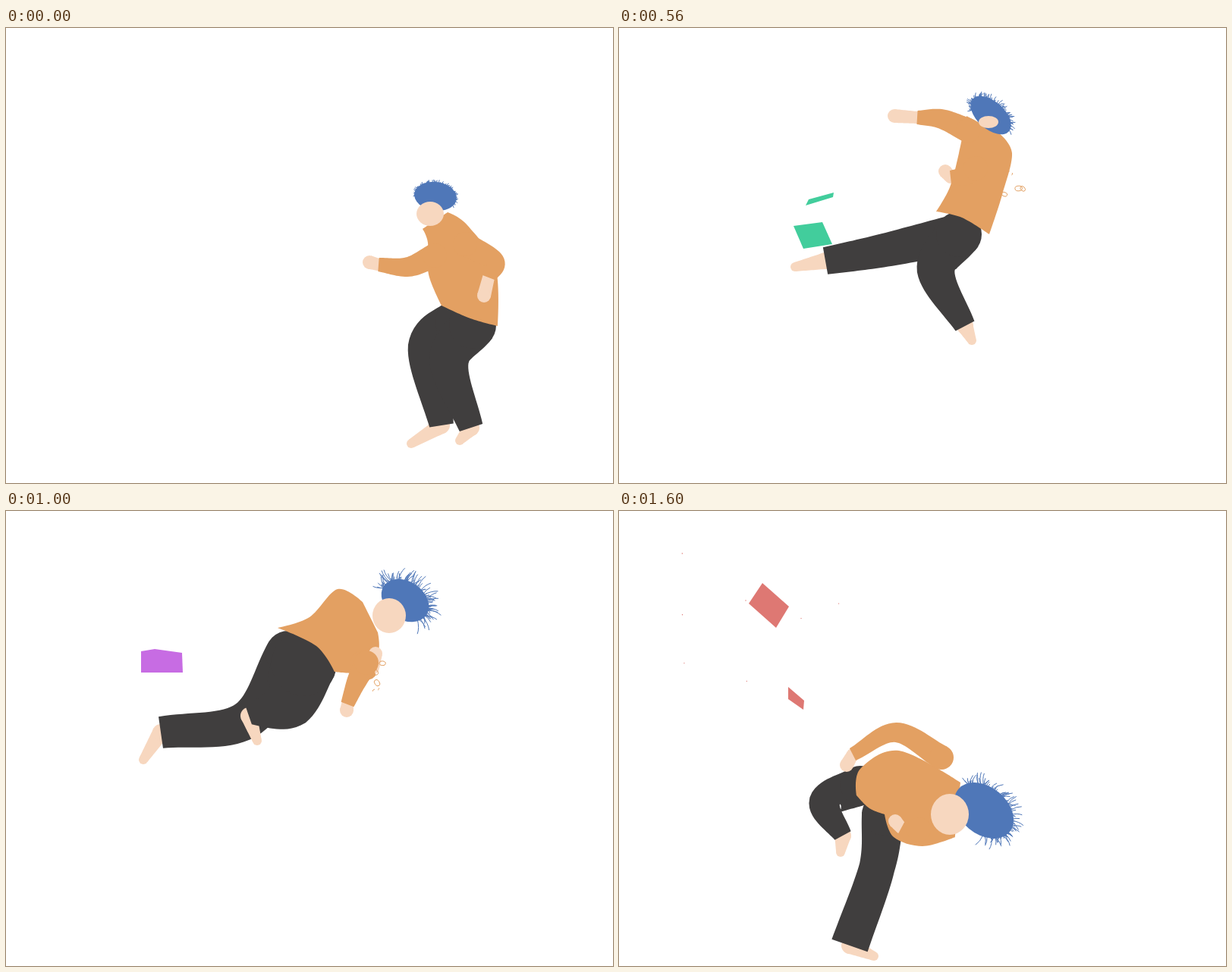
These frames come from a looping animation (800x600 px, 1640 ms). An HTML page with a canvas:

```html
<!DOCTYPE html>
<html lang="en">
<head>
<meta charset="utf-8">
<title>Triple kick</title>
<style>
html, body { margin: 0; width: 100%; height: 100%; overflow: hidden; background: #fff; }
canvas { display: block; }
</style>
</head>
<body>
<canvas id="stage" width="800" height="600"></canvas>
<script>
const ctx = document.getElementById('stage').getContext('2d');
const LOOP = 1640, STEP = 40;
const ORANGE = '#e3a062', SKIN = '#f7d7bf', DARK = '#403e3e', BLUE = '#4f77b8';
const GREEN = '#42cd9c', PURPLE = '#c76ce3', RED = '#de7873';

// Key poses of the rig.
// legs: hip, knee, ankle, toe, then thigh and ankle radius; arms: shoulder, elbow, wrist, fingertip
// torso: neck front and back, two down the back, waist (3), belly, chest
// face: centre, radii; hair: centre, radii, tilt in degrees; shag: strand length
const poses = [
  { t: 0, shag: 4,
    legs: [[600, 388, 558, 423, 574, 524, 534, 548, 34, 16], [615, 392, 584, 440, 613, 527, 598, 544, 31, 16]],
    arms: [[565, 300, 530, 315, 491, 312, 479, 309], [605, 285, 644, 308, 636, 329, 630, 353]],
    torso: [549, 265, 582, 243, 608, 260, 645, 315, 648, 393, 612, 383, 574, 366, 557, 325, 556, 283],
    face: [559, 245, 18, 16], hair: [566, 222, 28, 19, 8] },
  { t: 360, shag: 5,
    legs: [[455, 325, 383, 303, 327, 302, 304, 288, 26, 20], [472, 357, 464, 430, 450, 549, 467, 571, 27, 18]],
    arms: [[445, 218, 405, 187, 399, 163, 418, 163], [540, 235, 563, 208, 541, 151, 523, 131]],
    torso: [481, 212, 518, 209, 554, 232, 527, 290, 522, 362, 475, 341, 429, 296, 437, 245, 440, 205],
    face: [497, 196, 17, 16], hair: [506, 182, 29, 20, 20] },
  { t: 560, shag: 7,
    legs: [[440, 273, 345, 294, 272, 307, 232, 315, 26, 18], [448, 272, 418, 320, 456, 393, 465, 412, 30, 14]],
    arms: [[460, 135, 425, 120, 393, 118, 363, 116], [470, 185, 455, 195, 437, 197, 430, 189]],
    torso: [458, 116, 500, 138, 518, 165, 505, 220, 488, 272, 452, 250, 418, 242, 436, 210, 448, 165],
    face: [487, 124, 13, 8], hair: [490, 115, 32, 18, 42] },
  { t: 840, shag: 6,
    legs: [[392, 205, 308, 226, 206, 187, 160, 184, 28, 20], [414, 212, 418, 290, 340, 357, 327, 397, 32, 21]],
    arms: [[410, 130, 395, 140, 385, 155, 385, 155], [505, 135, 513, 173, 486, 204, 486, 204]],
    torso: [440, 108, 495, 114, 500, 140, 482, 185, 448, 221, 420, 183, 371, 165, 383, 139, 410, 118],
    face: [460, 102, 5, 4], hair: [473, 96, 28, 18, 20] },
  { t: 1000, shag: 16,
    legs: [[372, 188, 316, 276, 204, 292, 181, 328, 30, 21], [393, 201, 370, 253, 320, 270, 331, 303, 43, 12]],
    arms: [[470, 200, 476, 210, 484, 207, 487, 188], [475, 200, 462, 225, 450, 255, 449, 263]],
    torso: [470, 120, 490, 160, 491, 185, 475, 212, 433, 212, 409, 178, 358, 154, 400, 140, 437, 103],
    face: [505, 138, 22, 23], hair: [526, 118, 34, 25, 35] },
  { t: 1240, shag: 8,
    legs: [[348, 262, 344, 345, 331, 455, 336, 498, 28, 15], [335, 232, 280, 162, 227, 91, 168, 44, 25, 15]],
    arms: [[410, 172, 362, 166, 358, 205, 357, 226], [465, 255, 458, 275, 426, 299, 415, 299]],
    torso: [455, 185, 480, 230, 486, 260, 450, 291, 379, 294, 360, 280, 352, 260, 372, 216, 425, 165],
    face: [480, 207, 20, 24], hair: [494, 186, 29, 35, 0] },
  { t: 1600, shag: 14,
    legs: [[348, 400, 340, 470, 304, 573, 336, 587, 28, 25], [318, 362, 272, 385, 295, 428, 292, 450, 26, 12]],
    arms: [[425, 325, 365, 292, 308, 321, 300, 335], [395, 420, 385, 425, 372, 418, 364, 409]],
    torso: [450, 358, 443, 430, 400, 442, 362, 430, 350, 400, 330, 392, 313, 375, 318, 340, 369, 316],
    face: [436, 400, 25, 27], hair: [481, 395, 44, 31, 40] }
];

const mix = (a, b, k) => a + (b - a) * k;
const mixAll = (a, b, k) => a.map((v, i) => mix(v, b[i], k));
const noise = n => { const s = Math.sin(n * 127.1 + 3.7) * 43758.5453; return s - Math.floor(s); };
const pairs = list => list.flatMap((v, i) => i % 2 ? [] : [[v, list[i + 1]]]);

// Bones swing the short way round and change length evenly.
function swing(a, b, k) {
  const out = mixAll(a, b, k);
  for (let j = 2; j < 8; j += 2) {
    const ax = a[j] - a[j - 2], ay = a[j + 1] - a[j - 1], bx = b[j] - b[j - 2], by = b[j + 1] - b[j - 1];
    const turn = Math.atan2(ax * by - ay * bx, ax * bx + ay * by);
    const angle = Math.atan2(ay, ax) + turn * k, len = mix(Math.hypot(ax, ay), Math.hypot(bx, by), k);
    out[j] = out[j - 2] + len * Math.cos(angle);
    out[j + 1] = out[j - 1] + len * Math.sin(angle);
  }
  return out;
}

function fill(pts, color) {
  ctx.beginPath();
  pts.forEach(p => ctx.lineTo(p[0], p[1]));
  ctx.fillStyle = color;
  ctx.fill();
}

function oval(x, y, rx, ry, color, tilt = 0) {
  ctx.beginPath();
  ctx.ellipse(x, y, Math.max(rx, 0), Math.max(ry, 0), tilt, 0, 2 * Math.PI);
  ctx.fillStyle = color;
  ctx.fill();
}

// Tapered tube along a smooth line, round at its root.
function tube(joints, radii, color) {
  const last = joints.length - 1, left = [], right = [];
  const slope = i => {
    const a = joints[Math.max(i - 1, 0)], b = joints[Math.min(i + 1, last)];
    const half = i > 0 && i < last ? 2 : 1;
    return [(b[0] - a[0]) / half, (b[1] - a[1]) / half];
  };
  for (let i = 0; i < last; i++) {
    const p = joints[i], q = joints[i + 1], m = slope(i), n = slope(i + 1);
    for (let s = 0; s <= 16; s++) {
      const u = s / 16, v = 1 - u, r = mix(radii[i], radii[i + 1], u);
      const at = c => p[c] * (1 + 2 * u) * v * v + m[c] * u * v * v + q[c] * u * u * (3 - 2 * u) - n[c] * u * u * v;
      const way = c => 6 * u * v * (q[c] - p[c]) + m[c] * v * (1 - 3 * u) + n[c] * u * (3 * u - 2);
      const x = at(0), y = at(1), dx = way(0), dy = way(1), d = Math.hypot(dx, dy) || 1;
      left.push([x - dy / d * r, y + dx / d * r]);
      right.unshift([x + dy / d * r, y - dx / d * r]);
    }
  }
  fill([...left, ...right], color);
  oval(...joints[0], radii[0], radii[0], color);
}

function tip(from, to, r1, r2) {
  tube([from, to], [r1, r2], SKIN);
  oval(...to, r2, r2, SKIN);
}

function drawLeg(leg) {
  const [hip, knee, ankle, toe] = pairs(leg.slice(0, 8)), [thigh, cuff] = leg.slice(8);
  tip(ankle, toe, 11, 6);
  tube([hip, knee, ankle], [thigh, thigh * .84, cuff], DARK);
}

function drawArm(arm) {
  const [shoulder, elbow, wrist, hand] = pairs(arm);
  tip(wrist, hand, 8, 9);
  tube([shoulder, elbow, wrist], [16, 13, 9], ORANGE);
}

// Smooth outline with corners at the neck and the waist ends.
function drawTorso(list) {
  const p = pairs(list), n = p.length, corner = [0, 1, 4, 6];
  const slope = (i, c) => corner.includes(i) ? 0 : (p[(i + 1) % n][c] - p[(i + n - 1) % n][c]) / 6;
  ctx.beginPath();
  ctx.moveTo(...p[0]);
  p.forEach((a, i) => {
    const j = (i + 1) % n, b = p[j];
    ctx.bezierCurveTo(a[0] + slope(i, 0), a[1] + slope(i, 1), b[0] - slope(j, 0), b[1] - slope(j, 1), ...b);
  });
  ctx.fillStyle = ORANGE;
  ctx.fill();
}

// Strands stand on the side of the hair turned away from the face.
function drawHead(face, [x, y, rx, ry, degrees], shag) {
  const tilt = degrees * Math.PI / 180, c = Math.cos(tilt), s = Math.sin(tilt);
  const away = Math.atan2(y - face[1], x - face[0]);
  oval(x, y, rx, ry, BLUE, tilt);
  ctx.lineWidth = 1;
  for (let i = 0; i < 90; i++) {
    const angle = away + (noise(i) - .5) * 3.8, a = angle - tilt;
    const ex = rx * Math.cos(a) * .92, ey = ry * Math.sin(a) * .92;
    const px = x + ex * c - ey * s, py = y + ex * s + ey * c;
    const way = angle + (noise(i + 100) - .4) * 1.2, len = shag * (.3 + noise(i + 200));
    const dx = Math.cos(way) * len, dy = Math.sin(way) * len;
    ctx.beginPath();
    ctx.moveTo(px, py);
    ctx.quadraticCurveTo(px + dx * .6 + dy * .15, py + dy * .6 - dx * .15, px + dx, py + dy);
    ctx.strokeStyle = BLUE;
    ctx.stroke();
  }
  oval(...face, SKIN);
}

// A few loose threads by the back of the shirt.
function drawThreads(x, y, t) {
  ctx.strokeStyle = ORANGE;
  ctx.lineWidth = 1;
  for (let i = 0; i < 5; i++) {
    const n = t + i * 9, r = 1 + 4 * noise(n);
    ctx.beginPath();
    ctx.ellipse(x + 30 * noise(n + 1), y + 60 * noise(n + 2) - 30, r, r * .7, n, 0, r > 3 ? 6.3 : 2);
    ctx.stroke();
  }
}

const piece = (color, dx, dy, ...list) => fill(pairs(list).map(([x, y]) => [x + dx, y + dy]), color);

function drawBoards(t) {
  if (t >= 480 && t < 560) piece(GREEN, 0, 0, 232, 222, 284, 216, 281, 286, 240, 291);
  if (t >= 560 && t < 720) {
    const d = t - 560;
    piece(GREEN, -d * .05, -d * .1, 246, 234, 250, 226, 283, 217, 282, 223);
    piece(GREEN, -d * .02, d * .25, 230, 261, 268, 256, 281, 285, 243, 291);
  }
  if (t >= 760 && t < 1120) piece(PURPLE, 0, 0, 178, 185, 196, 182, 232, 187, 233, 213, 178, 213);
  if (t >= 1200 && t < 1320) piece(RED, 0, 0, 173, 58, 163, 95, 165, 112, 215, 123, 226, 88, 228, 51, 190, 39);
  if (t >= 1320) {
    const k = (t - 1280) / 320, rest = 1 - k * k;
    piece(RED, 0, -40 * rest, 189, 95, 224, 126, 207, 154, 171, 122);
    piece(RED, -20 * rest, -150 * rest, 223, 232, 244, 250, 243, 262, 223, 248);
    for (let i = 0; i < 7; i++)
      oval(195 + k * (noise(i + 5) * 260 - 115), 85 + k * (noise(i + 50) * 190 - 30), .7, .7, RED);
  }
}

function draw(t) {
  let i = 0;
  while (i < poses.length - 2 && t >= poses[i + 1].t) i++;
  const a = poses[i], b = poses[i + 1], k = (t - a.t) / (b.t - a.t);
  const torso = mixAll(a.torso, b.torso, k);
  ctx.fillStyle = '#fff';
  ctx.fillRect(0, 0, 800, 600);
  drawBoards(t);
  a.legs.forEach((leg, n) => drawLeg(swing(leg, b.legs[n], k)));
  drawTorso(torso);
  drawHead(mixAll(a.face, b.face, k), mixAll(a.hair, b.hair, k), mix(a.shag, b.shag, k));
  a.arms.forEach((arm, n) => drawArm(swing(arm, b.arms[n], k)));
  if (t >= 200 && t < 1120) drawThreads(torso[6], torso[7], t);
}

const start = performance.now();
function tick() {
  const t = (performance.now() - start) % LOOP;
  draw(Math.floor(t / STEP) * STEP);
  requestAnimationFrame(tick);
}
tick();
</script>
</body>
</html>
```
